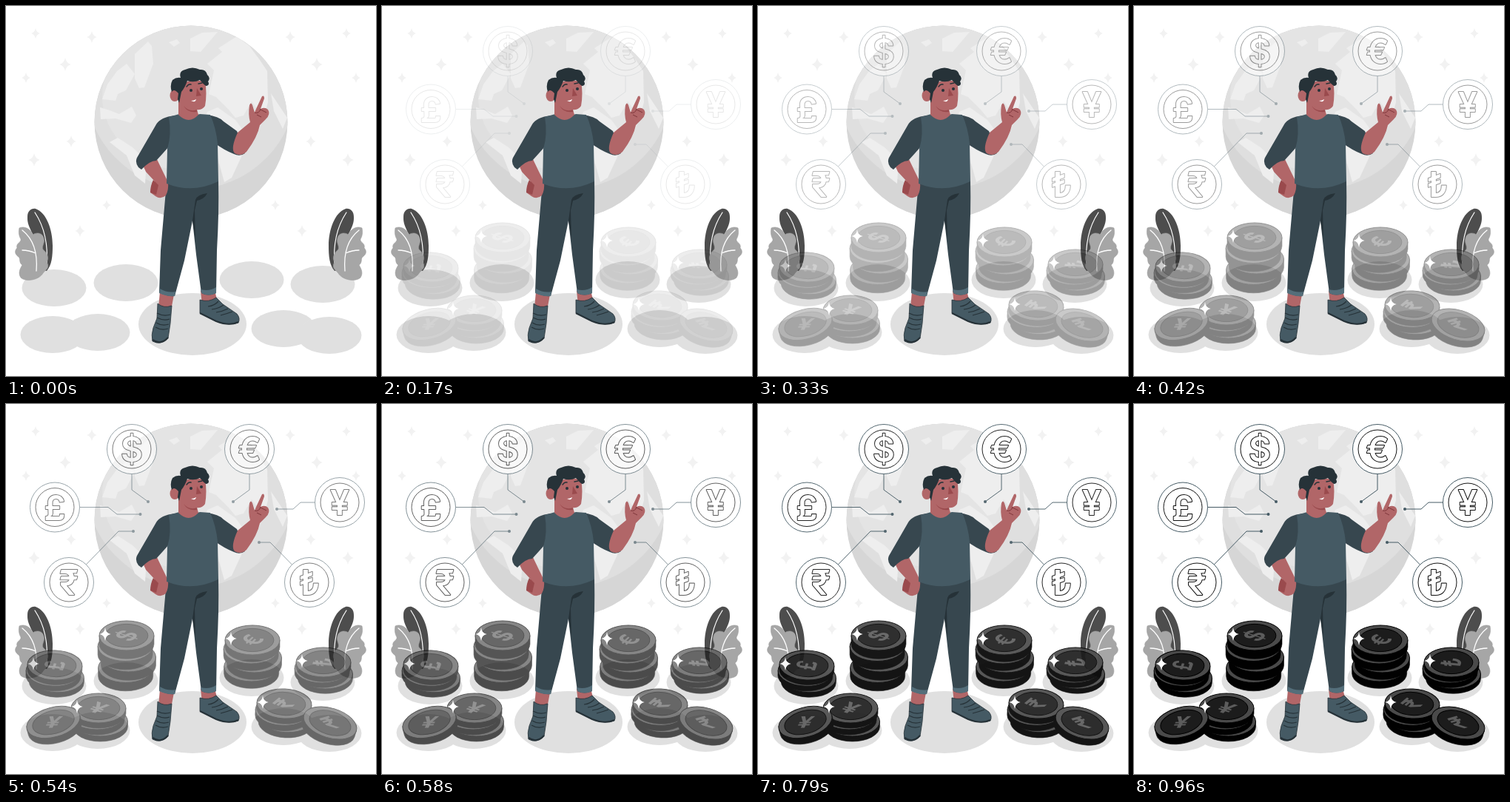
Animation of 500x500 px, one loop 1000 ms. Source, as an HTML page:

```html
<!DOCTYPE html>
<html lang="en">
<head>
<meta charset="utf-8">
<style>
  html, body { margin: 0; width: 100%; height: 100%; overflow: hidden; background: #fff; }
  svg { display: block; width: 100vw; height: 100vh; }
  text { font: 600 46px Inter, "Noto Sans", sans-serif; text-anchor: middle; }
  .line { fill: none; stroke: #455a64; }
  .icon text { fill: #fff; stroke: #111; stroke-width: 2; paint-order: stroke; stroke-linejoin: round; }
  .coin text { fill: #5c5c5c; font-size: 37px; font-weight: 700; }
  .vein { fill: none; stroke: #fff; stroke-linecap: round; }
</style>
</head>
<body>
<svg viewBox="0 0 500 500">
  <defs>
    <clipPath id="disc"><circle cx="250" cy="157" r="130.5"/></clipPath>
    <g id="plant">
      <path fill="#4d4d4d" d="M55 358C45 356 47 340 44 326C41 312 28 300 29 285C29 277 34 273 40 274C55 279 63 303 63 324C63 338 62 350 55 358Z"/>
      <path class="vein" stroke-width="1.2" d="M39 279C53 300 57 325 55 351"/>
      <path fill="#a6a6a6" stroke="#999" stroke-width=".6" d="M18 300C25 297 33 301 36 309C42 305 50 307 51 314C53 320 48 324 50 329C55 333 59 340 55 346C60 354 53 357 50 361C44 371 26 373 20 367C16 361 19 355 22 350C17 347 20 341 17 339C11 335 12 330 15 327C13 320 21 320 20 315C17 310 17 305 18 300Z"/>
      <path class="vein" stroke-width="1.3" d="M22 303C36 314 43 333 41 358M22 330Q31 330 40 334"/>
    </g>
  </defs>

  <g id="stars" fill="#f2f2f2"></g>

  <g clip-path="url(#disc)">
    <circle cx="250" cy="157" r="131" fill="#d6d6d6"/>
    <circle cx="250" cy="105" r="143" fill="#dfdfdf"/>
    <ellipse cx="242" cy="122" rx="112" ry="100" fill="#e4e4e4"/>
    <g fill="#eee">
      <path d="M174 65L192 48L197 54L199 78L187 110L180 111L174 98Z"/>
      <path d="M163 78L174 92L162 114L151 119L148 128L130 126L137 106L150 88Z"/>
      <path d="M127 137L140 141L153 146L170 136L176 148L169 158L148 152L128 153Z"/>
      <path d="M140 184L151 178L171 191L190 210L188 240L174 229L163 202Z"/>
      <path d="M220 49L231 45L235 50L227 55ZM249 44L265 36L286 35L263 62L249 61Z"/>
      <path d="M272 78L292 62L287 57L312 41L329 54L343 73L353 88L354 130L348 151L332 129L321 148L310 151L300 139L284 123L274 119L281 87Z"/>
      <path d="M272 143L286 137L310 154L325 174L318 204L305 232L295 238L280 184L267 158Z"/>
      <path d="M358 118L380 151L374 166L362 142Z"/>
    </g>
  </g>

  <g id="floor" fill="#e0e0e0"><ellipse cx="252" cy="430" rx="73" ry="42"/></g>
  <use href="#plant"/>
  <use href="#plant" transform="matrix(-1 0 0 1 499 0)"/>
  <g id="money" opacity="0"></g>

  <g id="man">
    <!-- ankles and shoes -->
    <path fill="#b16668" d="M208 386L227 390L223 411L206 408ZM263 385L282 384L286 401L265 404Z"/>
    <path fill="#455a64" stroke="#263238" stroke-width=".8" d="M205 402Q213 409 224 405L222 429L219 449Q209 459 198 453Q196 445 199 435L204 422ZM262 397Q274 401 284 394L293 403L312 416Q317 422 314 428Q303 433 284 426L262 415Z"/>
    <path fill="none" stroke="#263238" stroke-width="2.2" d="M198 451Q209 459 219 448M262 415L284 426Q302 433 314 427"/>
    <path fill="none" stroke="#263238" stroke-width="1.2" d="M204 415Q213 420 222 417M204 421Q213 426 221 423M203 428Q211 433 220 430M202 434Q210 439 219 436M273 406Q282 405 287 399M278 410Q287 409 294 404M284 414Q292 413 300 409M290 418Q298 416 306 413"/>
    <!-- trousers -->
    <path fill="#37474f" d="M217 238L287 236Q288 280 285 330L284 388Q273 393 264 388L257 336L252 290L241 344L228 392Q217 393 207 387L209 330Z"/>
    <path fill="#263238" d="M272 253Q258 255 256 262L252 290L256 316L255 276L258 263Q268 261 272 253Z"/>
    <path fill="#546e7a" d="M208 382Q218 388 229 386L228 392Q217 393 207 388ZM263 383Q275 386 284 380L284 388Q274 393 264 388Z"/>
    <!-- arms -->
    <path fill="#b16668" d="M184 213L203 205Q211 222 219 238Q220 249 216 256Q209 262 202 257L195 252L201 237L189 224Z"/>
    <path fill="#9a4a4d" d="M199 235L206 242L203 255L195 252Q195 243 199 235Z"/>
    <path fill="#37474f" d="M228 148Q209 150 203 160Q188 186 177 205Q174 211 179 218L183 221Q194 209 203 209Q214 197 228 181Z"/>
    <path fill="#37474f" d="M270 147Q288 149 294 156L312 169L318 184L323 199Q316 204 308 200Q295 195 280 184Z"/>
    <path fill="#b16668" d="M313 171L330 157Q327 147 329 134Q331 129 333 134L336 144L338 139L346 122Q349 120 349 125L344 139Q350 136 354 140Q358 146 351 153L343 161Q340 177 325 197Q317 204 309 199Q303 193 313 171Z"/>
    <path fill="none" stroke="#7f373b" d="M336 144Q342 146 344 139M339 147L345 150M344 140L352 144"/>
    <!-- torso -->
    <path fill="#455a64" d="M220 150L234 146Q248 151 262 146L276 147Q284 165 286 186L287 237Q252 254 217 240L218 193Q224 174 220 150Z"/>
    <!-- head -->
    <path fill="#b16668" d="M233 124L233 147Q247 161 260 147L257 136Z"/>
    <path fill="#9a4a4d" d="M240 135Q248 144 258 140L258 143Q246 145 240 135Z"/>
    <path fill="#b16668" d="M233 108Q245 98 269 102Q272 118 269 135Q264 143 251 139Q241 137 234 128Z"/>
    <ellipse cx="228" cy="121" rx="6.5" ry="8" fill="#b16668"/>
    <path fill="#263238" d="M234 131L232 126L233 118Q227 111 224 116Q221 107 225 100Q230 96 236 97Q233 88 242 86Q252 81 262 86Q270 85 272 93Q277 97 273 102Q276 107 270 108Q266 105 262 100Q254 104 245 101Q242 110 237 116Z"/>
    <path fill="#9a4a4d" d="M258 111L264 121L257 122Z"/>
    <path fill="#fff" d="M250 128Q254 128 257 126Q256 131 250 128Z"/>
    <path fill="none" stroke="#263238" stroke-width="1.4" stroke-linecap="round" d="M244 109Q247 105 250 106M260 105L265 104"/>
    <g fill="#263238"><circle cx="250" cy="114" r="2"/><circle cx="264" cy="112" r="2"/></g>
  </g>
</svg>
<script>
const get = id => document.getElementById(id);

// Four-pointed star; q sets how wide its waist is.
const star = (x, y, r, q) => `<path transform="translate(${x} ${y}) scale(${r})"
  d="M0-1Q${q}-${q} .85 0Q${q} ${q} 0 1Q-${q} ${q}-.85 0Q-${q}-${q} 0-1Z"/>`;

// Sky stars stand in mirrored pairs.
get('stars').innerHTML = [[40, 37], [116, 42], [80, 79], [27, 97], [88, 183], [38, 208], [136, 269], [100, 304]]
  .map(([x, y], i) => star(x, y, 7 + i % 3, .18) + star(500 - x, y, 7 + i % 3, .18)).join('');

// Each line runs from the icon's centre over a bend to its dot.
const icon = ([sign, x, y, bends, ex, ey]) => `<g class="icon">
  <polyline class="line" points="${x},${y} ${bends} ${ex},${ey}"/>
  <circle cx="${ex}" cy="${ey}" r="2" fill="#455a64"/>
  <circle cx="${x}" cy="${y}" r="33.5" fill="#fff" stroke="#455a64"/>
  <circle cx="${x}" cy="${y}" r="26" fill="#fff" stroke="#111"/>
  <text x="${x}" y="${y + 17}">${sign}</text></g>`;

const icons = [
  ['$', 170, 61, '170,116', 192, 132],
  ['€', 329, 61, '329,116', 307, 132],
  ['£', 66, 139.5, '138,139.5 150,149', 181.5, 149],
  ['¥', 451, 133, '398,133 388,142', 366, 142],
  ['₹', 85, 241, '152,172', 172, 172],
  ['₺', 410, 241, '357,187', 342, 187]
];

const rx = 37, ry = 20;
const oval = (k, style) => `<ellipse rx="${rx * k}" ry="${ry * k}" ${style}/>`;

// One coin: dark side, grey ring, dark inner face with a sign lying on it.
const coin = (x, y, h, tilt, sign, turn) => `<g class="coin" transform="translate(${x} ${y}) rotate(${tilt})">
  <path d="M${-rx} 0V${h}A${rx} ${ry} 0 0 0 ${rx} ${h}V0Z" stroke="#000" stroke-width=".6"/>
  ${oval(1, 'fill="#4a4a4a" stroke="#000"')}
  ${oval(.78, 'fill="#1c1c1c" stroke="#000"')}
  <text y="13" transform="scale(1 ${ry / rx}) rotate(${turn})">${sign}</text></g>`;

// sign, its turn, centre of the top face, foot of the pile, coins, tilt
const piles = [
  ['£', -80, 66, 353, 398, 3, 2],
  ['$', -60, 163, 313, 391, 4, 0],
  ['€', -60, 333, 319, 387, 4, 0],
  ['₺', -80, 429, 349, 393, 3, 0],
  ['¥', 30, 125, 411, 458, 3, 0],
  ['¥', 25, 64, 430, 461, 1, -15],
  ['₹', -60, 376, 405, 453, 3, 3],
  ['₹', -50, 438, 431, 462, 1, 17]
];

const pile = ([sign, turn, x, top, foot, count, tilt]) => {
  const step = (foot - top - ry) / count;
  let out = '';
  for (let i = count - 1; i >= 0; i--)
    out += coin(x + 2.5 * Math.sin(4 * i), top + i * step, step * .78, tilt, i ? '' : sign, turn);
  return out;
};

get('floor').innerHTML += piles.map(([, , x, , foot]) =>
  `<ellipse cx="${x - 1}" cy="${foot - 17}" rx="43.5" ry="25"/>`).join('');

const glints = piles.filter(p => p[5] > 1).map(([, , x, y]) => star(x - 29, y - 2, 9, .1)).join('');
get('money').innerHTML = icons.map(icon).join('') + piles.map(pile).join('') + `<g fill="#fff">${glints}</g>`;

// The fade moves in 24 ticks a second, and some ticks repeat the one before.
const held = [5, 7, 9, 13, 15, 20];

function draw(now) {
  let tick = Math.min(23, Math.floor((now % 1000 + 4) * .024));
  if (held.includes(tick)) tick--;
  const u = tick < 4 ? 0 : Math.min(1, tick / 24 + .03);
  get('money').setAttribute('opacity', u * u * (3 - 2 * u));
  requestAnimationFrame(draw);
}
requestAnimationFrame(draw);
</script>
</body>
</html>
```
